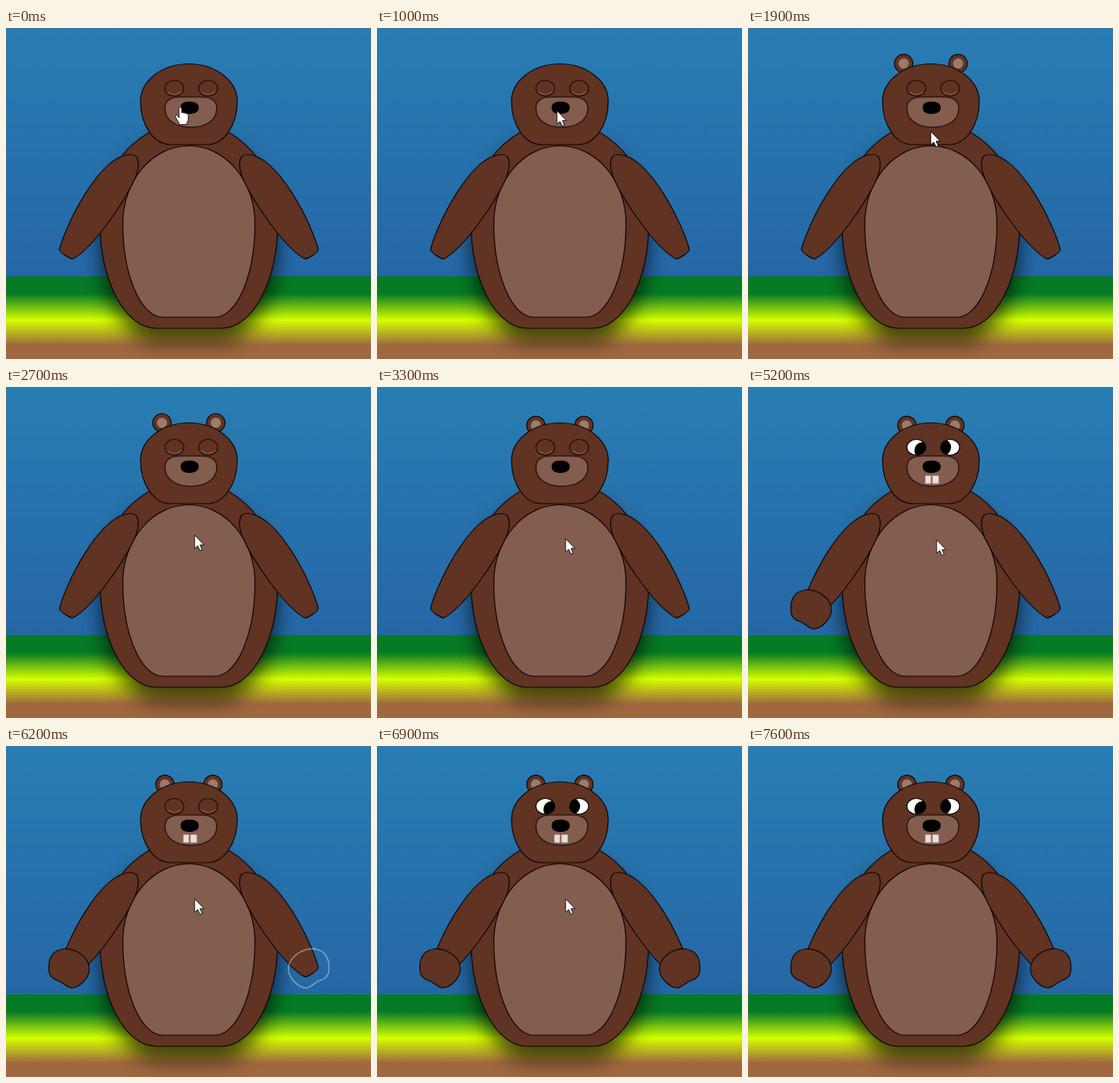
An HTML page that plays this animation: 464 by 420 pixels, repeating every 7.7 s.

```html
<!DOCTYPE html>
<html lang="en">
<head>
<meta charset="utf-8">
<title>Bear</title>
<style>
  html, body { margin: 0; width: 100%; height: 100%; overflow: hidden; }
  svg { display: block; width: 100vw; height: 100vh; }
  .fur { fill: #603323; stroke: #0c0503; stroke-width: 1.2; }
  .skin { fill: #835d4e; stroke: #0c0503; stroke-width: 1.2; }
  .trace { fill: none; stroke: #c9d6df; stroke-width: 1.5; }
</style>
</head>
<body>
<svg viewBox="0 0 464 420" preserveAspectRatio="none">
  <defs>
    <linearGradient id="sky" x1="0" y1="0" x2="0" y2="1">
      <stop offset="0" stop-color="#297db3"/>
      <stop offset="1" stop-color="#2567a5"/>
    </linearGradient>
    <linearGradient id="ground" gradientUnits="userSpaceOnUse" x1="0" y1="315" x2="0" y2="420">
      <stop offset="0" stop-color="#067a24"/>
      <stop offset=".21" stop-color="#067a24"/>
      <stop offset=".53" stop-color="#d4ff00"/>
      <stop offset=".83" stop-color="#a0683f"/>
      <stop offset="1" stop-color="#a0683f"/>
    </linearGradient>
    <filter id="blur" x="-30%" y="-30%" width="160%" height="160%">
      <feGaussianBlur stdDeviation="13"/>
    </filter>
    <clipPath id="leftEye"><ellipse cx="214" cy="76.5" rx="12" ry="10"/></clipPath>
    <clipPath id="rightEye"><ellipse cx="257" cy="76.5" rx="12" ry="10"/></clipPath>
    <path id="body" d="M119.5 246A113 127 0 0 1 345.5 246A71 135 0 0 1 274.5 381H190.5A71 135 0 0 1 119.5 246Z"/>
    <path id="arm" d="M68 281C75 252 118 162 158 160.5C172 160 169 178 164 191C150 222 110 280 85 293C82 293 69 286 68 281Z"/>
    <path id="hand" d="M73 257.5C88 256 106 268 106 283C106 294 94 306 84 307C79 307.5 74 301 66 297.5C56 294.5 54 289 54.5 279C55 266 62 259 73 257.5Z"/>
    <g id="ear">
      <circle class="fur" r="11.7"/>
      <circle r="6.5" fill="#9a7b6f"/>
    </g>
  </defs>

  <rect width="464" height="316" fill="url(#sky)"/>
  <rect y="315" width="464" height="105" fill="url(#ground)"/>
  <use href="#body" y="17" opacity=".68" filter="url(#blur)"/>
  <use href="#body" class="fur"/>
  <path class="skin" d="M148.5 248A84 98.5 0 0 1 316.5 248A51 119 0 0 1 265.5 367H199.5A51 119 0 0 1 148.5 248Z"/>

  <use id="earL" href="#ear"/>
  <use id="earR" href="#ear"/>
  <path class="fur" d="M171 93A61.5 47.5 0 0 1 294 93A38 55 0 0 1 256 148H209A38 55 0 0 1 171 93Z"/>

  <g id="closed" fill="none">
    <g stroke="#8c6252" stroke-width="1.2">
      <path d="M205 81Q214 88 223 81"/>
      <path d="M248 81Q257 88 266 81"/>
    </g>
    <g stroke="#1c0d08" stroke-width="1.2">
      <ellipse cx="214" cy="76.5" rx="12" ry="10"/>
      <ellipse cx="257" cy="76.5" rx="12" ry="10"/>
    </g>
  </g>
  <g id="open">
    <g fill="#fff" stroke="#000" stroke-width="1.2">
      <ellipse cx="214" cy="76.5" rx="12" ry="10"/>
      <ellipse cx="257" cy="76.5" rx="12" ry="10"/>
    </g>
    <circle cx="222" cy="80.5" r="10.5" clip-path="url(#leftEye)"/>
    <circle cx="248" cy="76.5" r="10.2" clip-path="url(#rightEye)"/>
  </g>

  <path d="M202 102C202 91 210 87.500 222 87.500H248C260 87.500 268 91 268 102C268 117 254 126 235 126S202 117 202 102Z" fill="#835d4e" stroke="#2d1710" stroke-width="1.6"/>
  <path d="M222 101C222 95 227 93.500 233 93.500S245 95 245 101S239 109 233 109S222 107 222 101Z"/>
  <g fill="#e6dfdc">
    <rect class="tooth" x="225.500" y="112.500" width="7"/>
    <rect class="tooth" x="234.500" y="112.500" width="8"/>
  </g>

  <g>
    <use href="#arm" class="fur"/>
    <g id="handL">
      <use href="#hand" class="fur"/>
      <use href="#hand" class="trace"/>
    </g>
  </g>
  <g transform="matrix(-1 0 0 1 465 0)">
    <use href="#arm" class="fur"/>
    <g id="handR">
      <use href="#hand" class="fur"/>
      <use href="#hand" class="trace"/>
    </g>
  </g>

  <g fill="#fff" stroke="#000" stroke-linejoin="round">
    <path id="arrow" d="M0 0V17L3.900 13.500L6.700 19.600L9.600 18.400L6.900 12.400H12Z" stroke-width=".9"/>
    <path id="pointer" stroke-width=".8" d="M220 102.500C220 99.800 223.200 99.800 223.200 102.500V107.500C224 106.600 226 106.800 226.200 108.200C227 107.300 229 107.700 229.200 109C230.300 108.500 231.700 109 231.700 110.600V115.500C231.700 118 229.800 119.500 229.500 122.500H220.500C220 119 216.700 116 215.500 112.800C215 110.800 217.300 110 218.500 111.800L220 114Z"/>
  </g>
</svg>
<script>
const LOOP = 7700, STEP = 100;
const $ = id => document.getElementById(id);
const ramp = (t, from, to) => Math.min(1, Math.max(0, (t - from) / (to - from)));
const smooth = x => x * x * (3 - 2 * x);
const show = (node, on) => node.style.display = on ? '' : 'none';
const teeth = document.querySelectorAll('.tooth');

// Vertical spring offset from the resting position
function earSpring(t) {
  if (t >= 3250) return 0;
  const s = Math.max(0, t - 1310);
  return -22 * Math.exp(-0.00094 * s) * Math.cos(2 * Math.PI * s / 840);
}

// A dotted outline is drawn first, then the fur fades in
function drawHand(group, t, start, traced, filled) {
  const [fur, trace] = group.children;
  const drawn = ramp(t, start, traced);
  const fill = ramp(t, traced + 100, filled);
  show(group, drawn > 0);
  fur.style.opacity = fill;
  trace.style.opacity = 1 - fill;
  trace.style.strokeDasharray =
    '1.100 0.900 '.repeat(Math.floor(drawn * 83)) + '0 200';
}

function drawCursor(t) {
  const down = smooth(ramp(t, 1600, 2400));
  const settle = smooth(ramp(t, 2900, 3500));
  show($('pointer'), t < 500);
  show($('arrow'), t >= 500 && t < 7000);
  $('arrow').setAttribute('transform',
    `translate(${228.8 + 11 * down} ${105 + 83 * down + 6 * settle})`);
}

function render(t) {
  const p = earSpring(t);
  $('earL').setAttribute('transform', `translate(${202 - 1.1 * p} ${48.8 - p})`);
  $('earR').setAttribute('transform', `translate(${263 + 1.1 * p} ${48.8 - p})`);

  const awake = (t >= 4800 && t < 5800) || t >= 6900;
  show($('open'), awake);
  show($('closed'), !awake);

  const growth = 10 * ramp(t, 3900, 4800);
  teeth.forEach(tooth => tooth.setAttribute('height', growth));

  drawHand($('handL'), t, 4100, 4700, 5150);
  drawHand($('handR'), t, 5500, 6150, 6900);
  drawCursor(t);
}

const start = performance.now();
function tick() {
  const t = (performance.now() - start) % LOOP;
  render(Math.floor(t / STEP) * STEP);
  requestAnimationFrame(tick);
}
render(0);
tick();
</script>
</body>
</html>
```
